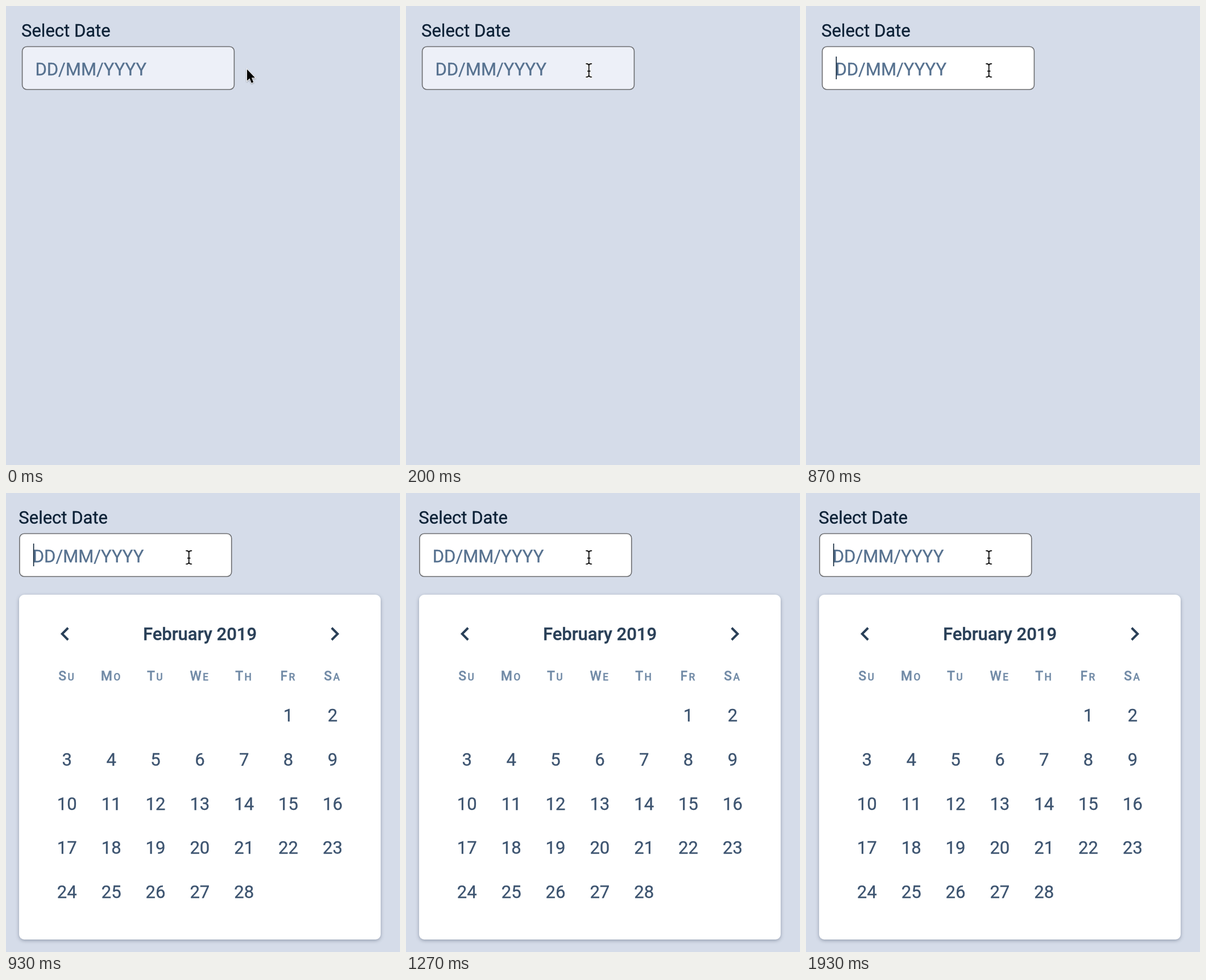
Write an HTML page that moves like this. It is 693x808 px and loops after 2.27 s.

```html
<!DOCTYPE html>
<html lang="en">
<head>
<meta charset="utf-8">
<title>Date picker</title>
<style>
  html, body { margin: 0; width: 100%; height: 100%; overflow: hidden; background: #d5dce9; }
  svg { display: block; width: 100%; height: 100%; }
  text { font: 400 31px Roboto, sans-serif; stroke-width: .35px; }
  .label { fill: #0c2136; stroke: #0c2136; }
  .hint { fill: #56718f; stroke: #56718f; }
  .month { font-weight: 500; fill: #2a4058; stroke: #2a4058; text-anchor: middle; }
  .day { fill: #3d5470; stroke: #3d5470; text-anchor: middle; }
  .week { font-size: 23px; font-weight: 500; letter-spacing: 2.3px; fill: #718aa6; stroke: #718aa6; text-anchor: middle; }
  .week tspan { font-size: 17.5px; }
  .chevron { fill: none; stroke: #2a4058; stroke-width: 4; }
  #card > rect { filter: drop-shadow(0 2px 3px rgba(30, 45, 70, .36)); }
  #arrow { filter: drop-shadow(0 1.5px 1.2px rgba(0, 0, 0, .35)); }
</style>
</head>
<body>
<svg viewBox="0 0 693 808" preserveAspectRatio="none">
  <rect width="693" height="808" fill="#d5dce9"/>
  <g id="field">
    <text class="label" x="27" y="54">Select Date</text>
    <rect id="box" x="28.6" y="71.5" width="372.8" height="75.5" rx="8" stroke="#6c6d70" stroke-width="1.6"/>
    <text class="hint" x="51.4" y="122">DD/MM/YYYY</text>
    <rect id="caret" x="52.5" y="89" width="1.6" height="40" fill="#0c2136"/>
  </g>
  <g id="card">
    <rect x="23" y="179" width="636" height="607" rx="9" fill="#fff"/>
    <path class="chevron" d="M109.2 237.5L98.7 248L109.2 258.5M572.8 237.5L583.3 248L572.8 258.5"/>
    <text class="month" x="341" y="258.5">February 2019</text>
  </g>
  <circle id="ring" cx="321" cy="113" r="25.4" fill="none" stroke="#000" stroke-width="2.4"/>
  <path id="arrow" d="M424 111.5V131.6L428.5 127.5L431.8 135.4L435.2 134L432 126.3H438Z" fill="#000" stroke="#fff" stroke-width="1.8" paint-order="stroke"/>
  <g id="beam" fill="none" stroke-linecap="round">
    <path id="halo" stroke="#fff" stroke-width="3.4"/>
    <path id="stem" stroke="#000" stroke-width="1.7"/>
  </g>
</svg>
<script>
const LOOP = 2270;
const COL = 77.85, ROW = 77.75, LEFT = 107.3;
const $ = id => document.getElementById(id);
const show = (id, on) => $(id).setAttribute('visibility', on ? 'visible' : 'hidden');
const shift = (id, x) => $(id).setAttribute('transform', `translate(${x} 0)`);

function addText(cls, x, y, content) {
  const el = document.createElementNS('http://www.w3.org/2000/svg', 'text');
  el.setAttribute('class', cls);
  el.setAttribute('x', x);
  el.setAttribute('y', y);
  el.innerHTML = content;
  $('card').append(el);
}

['SU', 'MO', 'TU', 'WE', 'TH', 'FR', 'SA'].forEach((name, i) =>
  addText('week', LEFT + i * COL, 330, `${name[0]}<tspan>${name[1]}</tspan>`));

for (let day = 1; day <= 28; day++) {
  const cell = day + 4;
  addText('day', LEFT + cell % 7 * COL, 402 + Math.floor(cell / 7) * ROW, day);
}

const beamPath = 'M317 101.6Q321.7 101.6 321.7 105V121.4Q321.7 125 317 125' +
  'M326.4 101.6Q321.7 101.6 321.7 105M321.7 121.4Q321.7 125 326.4 125M319.6 114.6H323.8';
$('halo').setAttribute('d', beamPath);
$('stem').setAttribute('d', beamPath);

function pointerOffset(t) {
  const step = t < 70 ? 0 : t < 140 ? 1 : t < 200 ? 2 : 3;
  return 102 * (1 - step / 3) ** 1.5;
}

function render(t) {
  const focused = t >= 800;
  const open = t >= 930;
  show('arrow', t < 70);
  show('beam', t >= 70);
  shift('beam', pointerOffset(t));
  show('ring', focused && t < 870);
  show('caret', focused && (t < 1270 || t >= 1800));
  show('card', open);
  shift('field', open ? -4.7 : 0);
  $('box').setAttribute('fill', focused ? '#fff' : '#edf0f8');
}

const start = performance.now();
function tick() {
  render((performance.now() - start) % LOOP);
  requestAnimationFrame(tick);
}
tick();
</script>
</body>
</html>
```
